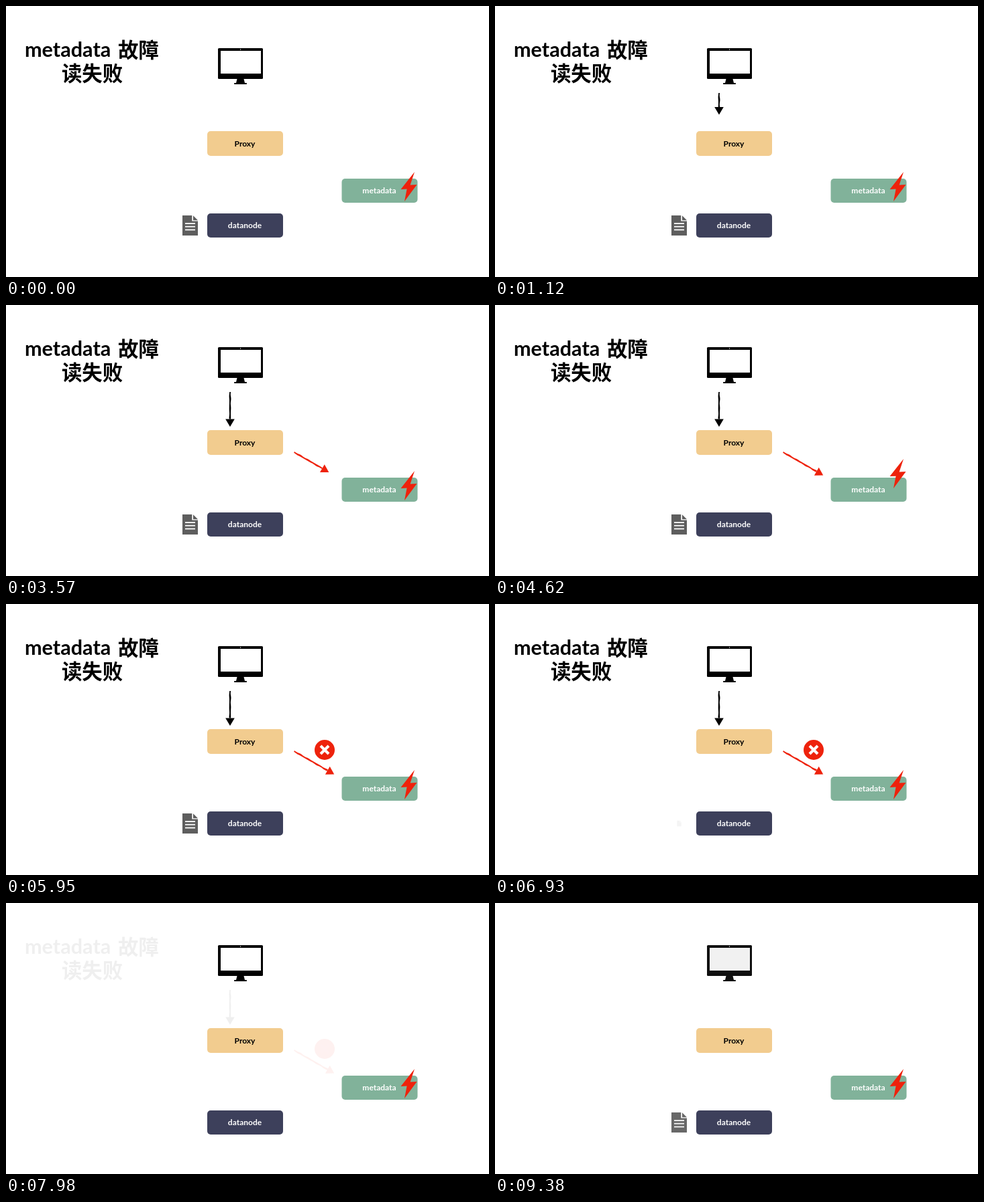
Write an HTML page with a canvas that moves like this. It is 720 px wide and 405 px high and loops after 9520 ms.

```html
<!DOCTYPE html>
<html lang="zh-CN">
<head>
<meta charset="utf-8">
<title>metadata 故障</title>
<style>
html, body { margin: 0; width: 100%; height: 100%; overflow: hidden; background: #fff; }
canvas { display: block; width: 720px; height: 405px; }
</style>
</head>
<body>
<canvas id="stage"></canvas>
<script>
const W = 720, H = 405, LOOP = 9520, STEP = 70;
const RED = '#ee220c', GRAY = '#5e5e5e';
const canvas = document.getElementById('stage');
const dpr = window.devicePixelRatio || 1;
canvas.width = W * dpr;
canvas.height = H * dpr;
const ctx = canvas.getContext('2d');

const clamp = v => Math.max(0, Math.min(1, v));
const progress = (t, start, length) => clamp((t - start) / length);
const smooth = p => (1 - Math.cos(Math.PI * p)) / 2;

function poly(points, color) {
  ctx.fillStyle = color;
  ctx.beginPath();
  points.forEach(([x, y]) => ctx.lineTo(x, y));
  ctx.closePath();
  ctx.fill();
}

function rect(x, y, w, h, color, r = 0) {
  ctx.fillStyle = color;
  ctx.beginPath();
  ctx.roundRect(x, y, w, h, r);
  ctx.fill();
}

function text(str, x, y, font, color, align = 'center') {
  ctx.font = font;
  ctx.fillStyle = color;
  ctx.textAlign = align;
  ctx.fillText(str, x, y);
}

// Draws with its own opacity and with a scale around (cx, cy).
function layer(alpha, draw, scale = 1, cx = 0, cy = 0) {
  if (alpha <= 0 || scale <= 0) return;
  ctx.save();
  ctx.globalAlpha = alpha;
  ctx.translate(cx, cy);
  ctx.scale(scale, scale);
  ctx.translate(-cx, -cy);
  draw();
  ctx.restore();
}

function box(label, x, y, h, fill, ink) {
  rect(x, y, 113, h, fill, 5);
  text(label, x + 56, y + h / 2 + 4.3, 'bold 12px Lato, sans-serif', ink);
}

function title() {
  const cjk = 'bold 30.4px "Noto Sans CJK SC", "Noto Sans CJK", sans-serif';
  text('metadata', 28, 76, 'bold 30.6px Lato, sans-serif', '#000', 'left');
  text('故障', 167, 76.5, cjk, '#000', 'left');
  text('读失败', 128.5, 112, cjk, '#000');
}

function monitor() {
  rect(316, 63, 67, 46, '#000', 1.5);
  rect(320, 67, 60, 34, '#fff');
  rect(348.8, 64.3, 1.4, 1.4, '#fff', 0.7);
  poly([[344.5, 109], [354.5, 109], [356, 115], [343, 115]], '#000');
  rect(340, 115, 19, 2, '#000', 0.8);
}

function sheet() {
  poly([[263, 313], [277.3, 313], [277.3, 321.6], [286, 321.6], [286, 343], [263, 343]], GRAY);
  poly([[279, 313.2], [286, 320.2], [279, 320.2]], GRAY);
  for (const y of [324.2, 328.8, 333.6]) rect(267, y, 15, 1.8, '#fff');
}

function bolt(dy) {
  const pts = [[609, 248], [588.5, 274], [597.6, 273.6], [594, 292], [612.5, 267], [602.6, 267.4]];
  poly(pts.map(([x, y]) => [x, y + dy]), RED);
}

function badge() {
  ctx.fillStyle = RED;
  ctx.beginPath();
  ctx.arc(475, 218, 15, 0, Math.PI * 2);
  ctx.fill();
  ctx.strokeStyle = '#fff';
  ctx.lineWidth = 4.2;
  ctx.beginPath();
  ctx.moveTo(469, 212);
  ctx.lineTo(481, 224);
  ctx.moveTo(481, 212);
  ctx.lineTo(469, 224);
  ctx.stroke();
}

// Chalky arrow that grows from (x, y); the head rides on the end of the line.
function arrow(x, y, angle, length, p, color, startAngle) {
  if (p <= 0) return;
  const done = length * p;
  const tip = done + 6 * (1 - p);
  const size = Math.min(1, 0.5 + done / 18);
  const back = tip - 11.5 * size;
  const rough = i => Math.sin(i * 12.9898) * 0.25 + Math.sin(i * 4.7) * 0.15;
  const young = done < 3;
  ctx.save();
  ctx.translate(x, y);
  ctx.rotate(young ? startAngle : angle);
  if (young) {
    poly([[-3.5, -4], [3.5, 0], [-3.5, 4]], color);
  } else {
    if (back > 0) {
      const top = [], bottom = [];
      for (let s = 0; s < back; s += 1.5) {
        top.push([s, -1.15 + rough(s)]);
        bottom.unshift([s, 1.15 + rough(s + 40)]);
      }
      poly([...top, [back, -1.1], [back, 1.1], ...bottom], color);
    }
    const half = 6.8 * size;
    poly([[back, -half], [tip, 0], [back, half]], color);
  }
  ctx.restore();
}

function fadeOut(t) {
  if (t < 7420) return 1;
  if (t < 7560) return 0.9375;
  return t < 8960 ? Math.max(0.0625, 0.8125 - (t - 7560) / 560) : 0;
}

function popIn(t) {
  const s = (t - 4900) / 1000;
  return s <= 0 ? 0 : 1 - Math.exp(-6 * s) * Math.cos(4 * s);
}

function popOut(p) {
  return 1 - (2.7 * p ** 3 - 1.7 * p ** 2);
}

function draw(t) {
  const out = fadeOut(t);
  const back = t < 8960 ? 0 : 0.1875 + (t - 8960) / 560;

  ctx.setTransform(dpr, 0, 0, dpr, 0, 0);
  ctx.fillStyle = '#fff';
  ctx.fillRect(0, 0, W, H);

  // The screen dips slightly while one copy replaces the other.
  layer(1 - back * (1 - back), monitor);
  box('Proxy', 300, 187, 37, '#f2cc8f', '#000');
  box('metadata', 500.5, 258, 36, '#81b29a', '#fff');
  box('datanode', 300, 310, 36, '#3d405b', '#fff');
  bolt(-56 * Math.sin(Math.PI * progress(t, 4050, 705)) ** 2);

  layer(out, () => {
    title();
    arrow(334, 130, Math.PI / 2, 52, smooth(progress(t, 20, 2000)), '#000', Math.PI / 2);
    arrow(429.5, 220, Math.PI / 6, 69, smooth(progress(t, 2090, 1970)), RED, -Math.PI / 2);
  });
  layer(out * progress(t, 4900, 400), badge, popIn(t), 475, 218);

  const leave = progress(t, 6160, 824);
  if (t < 7420) layer(1 - leave, sheet, popOut(leave), 274.5, 328);
  layer(back, sheet);
}

const start = performance.now();
function tick() {
  const t = (performance.now() - start) % LOOP;
  draw(Math.floor(t / STEP) * STEP);
  requestAnimationFrame(tick);
}
tick();
</script>
</body>
</html>
```
